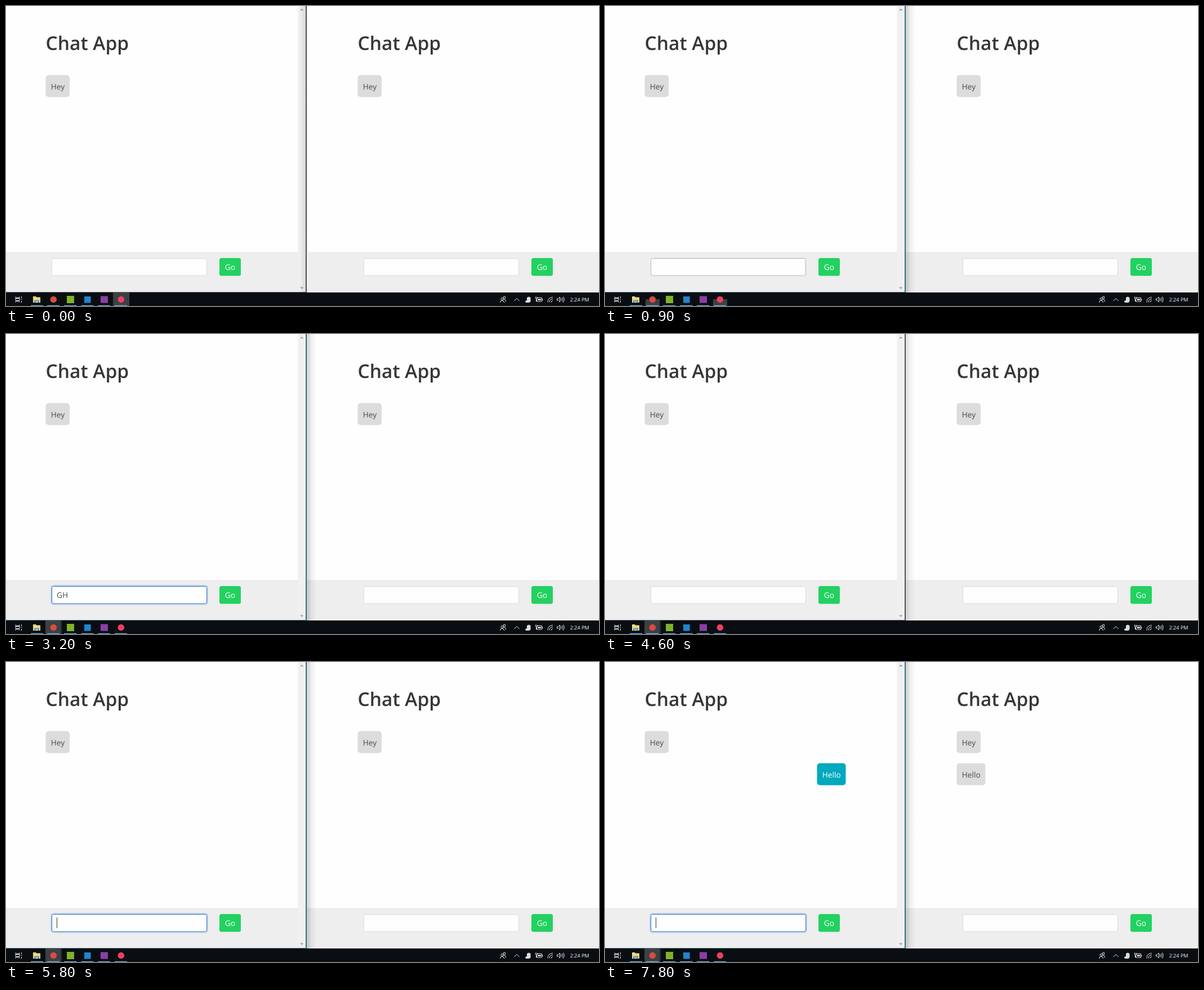
These frames come from a looping animation (1053x532 px, 8 s). An HTML page:

```html
<!DOCTYPE html>
<html lang="en">
<head>
<meta charset="utf-8">
<title>Chat App</title>
<style>
  html, body { margin: 0; width: 100%; height: 100%; overflow: hidden; background: #fefefe; }
  svg { display: block; width: 100%; height: 100%; }
  text { font: 13.7px "Open Sans", "Noto Sans", sans-serif; fill: #4a4a4a; text-rendering: geometricPrecision; }
  .title { font-size: 33.5px; font-weight: 600; fill: #363636; }
  .white { fill: #fff; }
  .clock { font-size: 9.1px; fill: #fff; }
  .field { fill: #fefefe; stroke: #dbdbdb; }
  .field.hover { stroke: #b5b5b5; }
  .field.focus { stroke: #3273dc; }
  .ring { fill: none; stroke: #3273dc; stroke-opacity: .25; stroke-width: 2; }
  .line { fill: none; stroke: #e8e8e8; stroke-width: 1; }
</style>
</head>
<body>
<svg viewBox="0 0 1053 532" preserveAspectRatio="none">
  <defs>
    <linearGradient id="fadeRight">
      <stop offset="0" stop-opacity=".2"/><stop offset=".5" stop-opacity=".06"/><stop offset="1" stop-opacity=".012"/>
    </linearGradient>
    <linearGradient id="fadeLeft">
      <stop offset="0" stop-opacity="0"/><stop offset="1" stop-opacity=".1"/>
    </linearGradient>
  </defs>
  <rect width="1053" height="532" fill="#fefefe"/>
  <rect y="436" width="1053" height="72" fill="#eee"/>
  <g id="panes"></g>

  <rect x="518.5" width="14" height="508" fill="#f0f0f0"/>
  <path d="M522 8l3.2-3.5 3.2 3.5zM522 498.500l3.2 3.500 3.200-3.500z" fill="#a3a3a3"/>
  <rect id="shadowLeft" x="521" width="11.500" height="508" fill="url(#fadeLeft)"/>
  <rect id="shadowRight" x="534" width="16" height="508" fill="url(#fadeRight)"/>
  <rect x="534" width="1" height="508" fill="#fff" fill-opacity=".4"/>
  <rect id="divider" x="532.300" width="1.700" height="508"/>
  <rect id="base" y="507.300" width="534" height=".7"/>

  <rect y="508" width="1053" height="24" fill="#0a0e13"/>
  <g fill="#3b4145">
    <rect id="recLit"/>
    <rect id="webLit"/>
  </g>
  <rect id="webEdge" x="97" y="508" width="2.500" height="24" fill="#22282c"/>
  <g id="marks" fill="#76b9ed"></g>

  <path class="line" d="M17 515.500v2h7v-2M17 525.500v-2h7v2M17 518.500h7v3.500h-7zM27.500 515v3M27.500 522.500v3.500M26.500 520h2"/>
  <path d="M48 515h5l1.500 1.500H61V526H48z" fill="#f8d775"/>
  <path d="M50 526v-4.500h9v4.500h-2.500v-2h-4v2z" fill="#3ba4e0"/>
  <circle cx="84.300" cy="520.500" r="5.800" fill="#dc4b3e"/>
  <rect x="108" y="514" width="13" height="13" fill="#7fb228"/>
  <rect x="139" y="515" width="11.500" height="11.500" fill="#1f86d0"/>
  <rect x="168" y="514.500" width="13" height="12" fill="#8b3fa6"/>
  <circle cx="204.300" cy="520.500" r="5.800" fill="#ed3f63"/>

  <path class="line" d="M877.500 526q0-4 3.500-4t3.500 4M883.500 520.500q4-1 4 3.500"/>
  <circle class="line" cx="881" cy="519.500" r="2"/>
  <circle class="line" cx="885" cy="517" r="2"/>
  <path class="line" d="M902.500 523l4.500-4.500 4.500 4.500"/>
  <path d="M922 524.500q0-2 3-2.500v-5l3-1.500 3.500 1.500v7.500l-3 1.500h-5z" fill="#d9dde0"/>
  <path class="line" d="M942.500 517.500h9v6.500h-9zM952.500 519.500v2.500M940.500 515.500v4M943 515.500v4M941.500 520v4"/>
  <path d="M944.500 519.500h5.500v2.500h-5.500z" fill="#e8e8e8"/>
  <path class="line" d="M962 525.500q0-9 9-9M965 525.500q0-6 6-6M968 525.500q0-3 3-3"/>
  <path class="line" d="M978.500 519h2l3-3v9l-3-3h-2zM985.500 518.500q1.500 2 0 4M987.500 517q2.500 3.500 0 7M989.500 515.500q3.500 5 0 10" stroke-width=".8"/>
  <text class="clock" x="1001.500" y="523.800">2:24 PM</text>
</svg>

<script>
const $ = id => document.getElementById(id);
const LOOP = 8000;

const bubble = (x, y, w, word, own) =>
  `<rect x="${x}" y="${y}" width="${w}" height="39" rx="5" fill="${own ? '#00a9be' : '#dcdcdc'}"/>
   <text x="${x + 9.2}" y="${y + 25.500}" class="${own ? 'white' : ''}">${word}</text>`;

const pane = (side, x, reply) => `<g transform="translate(${x})">
  <text class="title" x="70.500" y="78">Chat App</text>
  ${bubble(70.5, 122.5, 42.500, 'Hey')}
  <g id="reply${side}">${reply}</g>
  <rect id="ring${side}" class="ring" x="80" y="446" width="278" height="33.500" rx="4.500"/>
  <rect id="field${side}" class="field" x="81.500" y="447.500" width="275" height="30.500" rx="3"/>
  <path d="M83 448.700h272" stroke="#000" stroke-opacity=".06"/>
  <rect x="379" y="447" width="38" height="31.500" rx="3.500" fill="#23d160"/>
  <text class="white" x="388.800" y="468.300">Go</text>
</g>`;

$('panes').innerHTML =
  pane('Left', 0, bubble(376.5, 179.5, 51, 'Hello', true)) +
  pane('Right', 554, bubble(70.5, 179.5, 51, 'Hello')) +
  '<text id="typed" x="90" y="468.300"></text>' +
  '<rect id="caret" y="453" width="1" height="19" fill="#363636"/>';

$('marks').innerHTML = [44, 73, 103, 133.5, 163, 193]
  .map(x => `<rect x="${x}" y="530.800" width="22" height="1.200"/>`).join('');

// Each track lists [start time, value...]
const active = [[0, 'right'], [900, 'left'], [4600, 'none'], [5700, 'left']];
const taskbar = [[0, 'rec'], [900, 'both'], [1000, 'web'], [4700, 'rec'], [5700, 'both'], [5800, 'web']];
const leftField = [[0, ''], [700, 'hover'], [1000, 'focus'], [4600, ''], [5400, 'hover'], [5800, 'focus']];
const rightField = [[0, ''], [300, 'hover'], [400, '']];
const typing = [
  [0, '', 0], [1000, '', 1], [1400, '', 0], [1600, 'GH', 1], [1800, 'GHe', 1],
  [2000, 'GHel', 1], [2100, 'GHell', 1], [2300, 'GHello', 1], [2600, 'GHell', 1],
  [2800, 'GHell', 0], [3200, 'GH', 0], [3300, '', 1], [3700, '', 0], [4200, '', 1],
  [4600, '', 0], [5800, '', 1], [6300, '', 0], [6400, 'H', 1], [6700, 'He', 1],
  [6900, 'Hel', 1], [7000, 'Hell', 1], [7200, 'Hello', 1], [7700, 'Hello', 0], [7800, '', 1]
];
const SENT = 7800;

const at = (track, t) => track.findLast(step => step[0] <= t);
const show = (id, on) => $(id).setAttribute('visibility', on ? 'visible' : 'hidden');
const set = (id, attrs) => {
  for (const name in attrs) $(id).setAttribute(name, attrs[name]);
};

function setField(side, state) {
  set('field' + side, { class: 'field ' + state });
  show('ring' + side, state === 'focus');
}

// A taskbar highlight is half grown while the focus moves between apps
function setLit(id, x, state, own) {
  const half = state === 'both';
  show(id, half || state === own);
  set(id, half ? { x: x + 2, y: 520, width: 25, height: 12 }
               : { x, y: 508, width: own === 'web' ? 27 : 29, height: 24 });
}

function draw(t) {
  const win = at(active, t)[1];
  const edge = win === 'left' ? '#0a5a6b' : '#333';
  set('divider', { fill: edge });
  set('base', { fill: edge });
  show('shadowLeft', win === 'right');
  show('shadowRight', win !== 'right');
  set('shadowRight', { 'fill-opacity': win === 'left' ? 1 : .7 });

  const bar = at(taskbar, t)[1];
  setLit('recLit', 190, bar, 'rec');
  setLit('webLit', 70, bar, 'web');
  show('webEdge', bar === 'web');

  setField('Left', at(leftField, t)[1]);
  setField('Right', at(rightField, t)[1]);

  const [, word, caret] = at(typing, t);
  $('typed').textContent = word;
  const width = word ? $('typed').getComputedTextLength() : 0;
  set('caret', { x: Math.floor(90.25 + width) });
  show('caret', caret);

  show('replyLeft', t >= SENT);
  show('replyRight', t >= SENT);
}

const start = performance.now();
function frame() {
  draw((performance.now() - start) % LOOP);
  requestAnimationFrame(frame);
}
frame();
</script>
</body>
</html>
```
